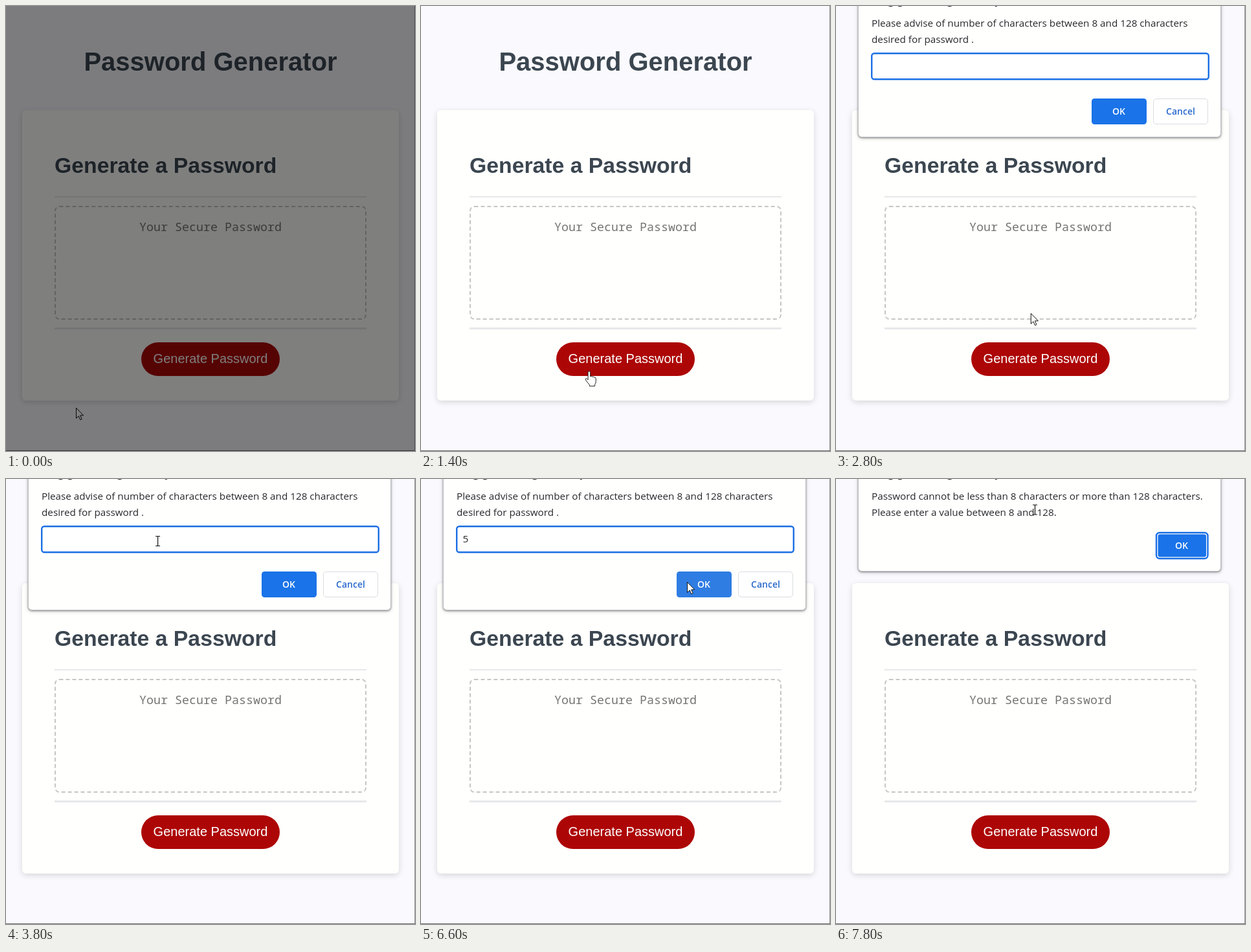
An HTML page that plays this animation: 632x688 px, repeating every 8000 ms.

```html
<!DOCTYPE html>
<html lang="en">
<head>
<meta charset="utf-8">
<title>Password Generator</title>
<style>
  html, body { margin: 0; width: 100%; height: 100%; overflow: hidden; }
  body { position: relative; background: #fafafe; }
  div, svg { position: absolute; box-sizing: border-box; }
  svg { left: 0; top: 0; overflow: visible; }
  text { white-space: pre; }
  .stage { left: 0; top: 0; width: 632px; height: 688px; overflow: hidden; }
  .card { left: 25px; top: 161px; width: 582px; height: 449px; border-radius: 6px;
    background: #fffffd; box-shadow: 0 2.5px 10px rgba(0, 0, 0, .15); }
  .rule { left: 75px; width: 482px; background: #e7e8ea; }
  .field { left: 75px; top: 309px; width: 482px; height: 176px;
    border: 2px dashed #c6c6c6; border-radius: 7.5px; }
  .generate { left: 209px; top: 520px; width: 214px; height: 52px; border-radius: 26px; background: #ad0606; }
  .heading { font: bold 40px "Liberation Sans", Arial, sans-serif; fill: #3b4650; }
  .sub { font-size: 33.75px; }
  .label { font: 20px "Liberation Sans", Arial, sans-serif; fill: #fff; }
  .hint { font: 18.33px "Noto Sans Mono", monospace; fill: #757575; }
  .dialog { left: 34px; top: -20px; width: 561px; transform-origin: 281px 20px;
    background: #fffffe; border: 1px solid #c3c5c9; border-radius: 6px;
    box-shadow: 0 1px 3px rgba(0, 0, 0, .45), 0 2px 7px rgba(0, 0, 0, .14); }
  .dialog svg { left: -35px; top: 19px; }
  .message { font: 15.25px "Open Sans", sans-serif; fill: #26282b; }
  .host { font: 600 16.5px "Open Sans", sans-serif; fill: #202124; }
  .action { font: 600 14px "Open Sans", sans-serif; text-anchor: middle; fill: #fff; }
  .mid { text-anchor: middle; }
  .shade { inset: 0; background: #000; opacity: .5; }
</style>
</head>
<body>
<div class="stage">
  <div class="card"></div>
  <div class="rule" style="top:294px;height:2px"></div>
  <div class="field"></div>
  <div class="rule" style="top:497px;height:3px"></div>
  <div class="generate"></div>
  <svg width="632" height="688">
    <text class="heading mid" x="316" y="100">Password Generator</text>
    <text class="heading sub" x="75" y="258">Generate a Password</text>
    <text class="hint" x="206" y="348">Your Secure Password</text>
    <text class="label mid" x="316" y="552">Generate Password</text>
    <path d="M631.5 0V688" stroke="#9a9ca2"/>
    <path d="M0 687.5H632" stroke="#686b72"/>
  </svg>

  <div class="dialog" id="prompt" style="height:223px">
    <svg width="632" height="204">
      <text class="host" x="55" y="-3">long-gate-strings.test says</text>
      <text class="message" x="55" y="32">Please advise of number of characters between 8 and 128 characters</text>
      <text class="message" x="55" y="57">desired for password .</text>
      <rect x="55.2" y="73.2" width="520.6" height="40" rx="4" fill="#fff" stroke="#1a6fe4" stroke-width="2.4"/>
      <text class="message" id="typed" x="64.5" y="98">5</text>
      <path id="caret" d="M65.5 83V103" stroke="#222"/>
      <rect id="ok" x="395" y="143" width="85" height="40" rx="4.5"/>
      <text class="action" x="437" y="168">OK</text>
      <rect x="490.5" y="143.5" width="84" height="39" rx="4.5" fill="#fff" stroke="#dadce0"/>
      <text class="action" x="532.5" y="168" style="fill:#2a69cc">Cancel</text>
    </svg>
  </div>

  <div class="dialog" id="alert" style="height:163px">
    <svg width="632" height="144">
      <text class="host" x="55" y="-3">long-gate-strings.test says</text>
      <text class="message" x="55" y="32">Password cannot be less than 8 characters or more than 128 characters.</text>
      <text class="message" x="55" y="57">Please enter a value between 8 and 128.</text>
      <rect x="495" y="83" width="79.5" height="40" rx="5" fill="#fff" stroke="#1a6fe4" stroke-width="2.4"/>
      <rect x="497.5" y="85.5" width="74.5" height="35" rx="3" fill="#1a73e8"/>
      <text class="action" x="534" y="108">OK</text>
    </svg>
  </div>

  <svg width="632" height="688">
    <g id="pointer">
      <path id="arrow" d="M.5 .5V16.5L4.2 13L6.8 18.8L9.2 17.8L6.7 12H11.7Z" fill="#fff" stroke="#111"/>
      <path id="hand" fill="#fff" stroke="#222" stroke-linejoin="round"
        d="M-1.8 2Q-1.8 0 0 0T1.8 2V8Q3.6 7 5 8.6Q6.6 7.8 7.8 9.4Q10.4 9 10.4 11.5V16Q10.4 18.5 8.8 20.5V23H.5V21Q-2 18-5.5 13.5Q-6.2 11.5-4.6 11.2Q-3 11.3-1.8 13.2Z"/>
      <path id="beam" d="M-3.5-7.5H-1Q0-7.5 0-6.5Q0-7.5 1-7.5H3.5M0-6.5V6.5M-3.5 7.5H-1Q0 7.5 0 6.5Q0 7.5 1 7.5H3.5"
        fill="none" stroke="#111" stroke-width="1.2"/>
    </g>
  </svg>
  <div class="shade" id="shade"></div>
</div>

<script>
const LOOP = 8000, STEP = 200;
const $ = id => document.getElementById(id);
const show = (id, on) => { $(id).style.display = on ? '' : 'none'; };

// Pointer stops: time, x, y
const stops = [
  [0, 108, 621], [600, 108, 621], [1800, 313, 545], [2600, 313, 545],
  [3400, 234.5, 96], [5400, 235.5, 96], [6400, 411, 159], [7000, 411, 159],
  [7800, 307.5, 47.5], [LOOP, 307.5, 47.5]
];

const ease = p => p * p * (3 - 2 * p);
const inside = (x, y, left, top, right, bottom) => x >= left && x <= right && y >= top && y <= bottom;

function pointerAt(t) {
  const i = stops.findIndex(s => s[0] > t);
  const [t0, x0, y0] = stops[i - 1], [t1, x1, y1] = stops[i];
  const p = ease((t - t0) / (t1 - t0));
  return [x0 + (x1 - x0) * p, y0 + (y1 - y0) * p];
}

function pointerKind(x, y, prompting, alerting) {
  if (inside(x, y, 209, 520, 423, 572)) return 'hand';
  const onInput = prompting && inside(x, y, 54, 72, 577, 114);
  const onText = (prompting || alerting) && inside(x, y, 55, 15, 566, 62);
  return onInput || onText ? 'beam' : 'arrow';
}

// A dialog tilts in faintly for one step, then stands flat.
function drawDialog(id, t, from, to) {
  const open = t >= from && t < to, entering = t < from + STEP;
  show(id, open);
  $(id).style.opacity = entering ? .21 : 1;
  $(id).style.transform = entering
    ? 'matrix3d(1,0,0,0, 0,1.006,0,-.000105, 0,0,1,0, 0,-20.3,0,1)' : 'none';
  return open;
}

function draw(t) {
  const prompting = drawDialog('prompt', t, 2200, 7000);
  const alerting = drawDialog('alert', t, 7000, LOOP);
  const [x, y] = pointerAt(t);
  const kind = pointerKind(x, y, prompting, alerting);
  for (const k of ['arrow', 'hand', 'beam']) show(k, k === kind);
  $('pointer').setAttribute('transform', `translate(${x} ${y})`);

  const typed = t >= 4800;
  show('typed', typed);
  show('caret', t < 5600 && (t - (typed ? 4800 : 2200)) % 1000 < 500 && t !== 3800);
  $('caret').setAttribute('transform', `translate(${typed ? 8 : 0} 0)`);
  $('ok').setAttribute('fill', inside(x, y, 395, 143, 480, 183) ? '#2f7de3' : '#1a73e8');
  show('shade', t < STEP);
}

const start = performance.now();
function tick() {
  const t = (performance.now() - start) % LOOP;
  draw(Math.floor(t / STEP) * STEP);
  requestAnimationFrame(tick);
}
tick();
</script>
</body>
</html>
```
